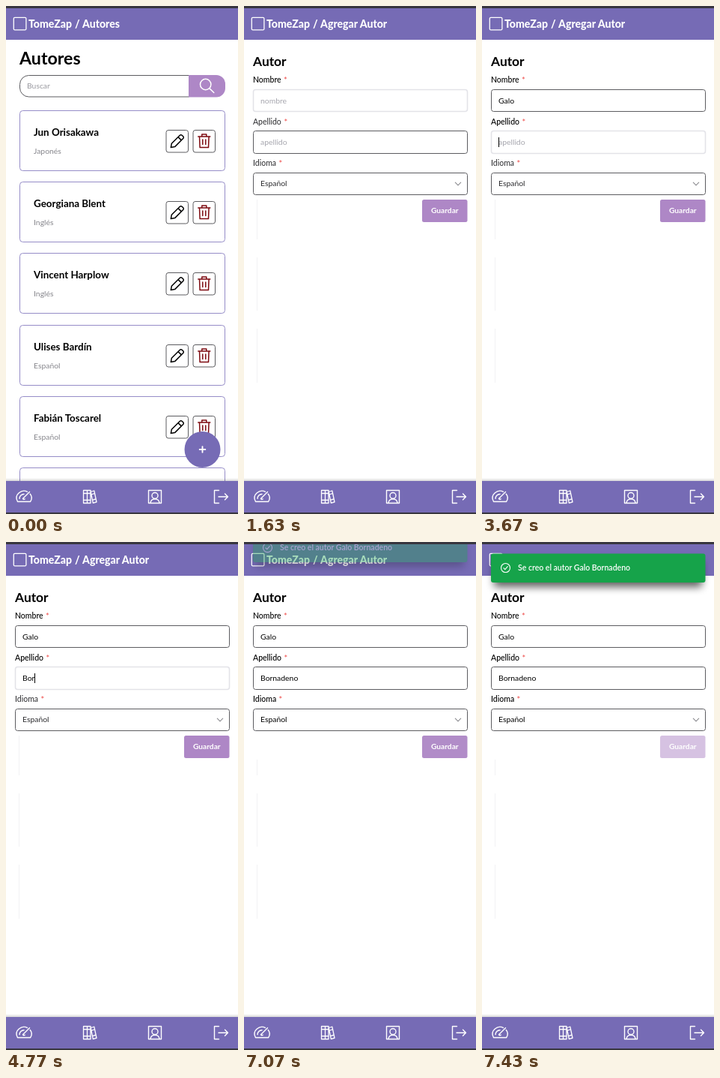
An HTML page that plays this animation: 310 by 677 pixels, repeating every 8 s.

```html
<!DOCTYPE html>
<html lang="es">
<head>
<meta charset="utf-8">
<title>Agregar autor</title>
<style>
  html, body { margin: 0; width: 100%; height: 100%; overflow: hidden; background: #fff; }
  svg { display: block; width: 310px; height: 677px; }
  text { font-family: Lato, Figtree, sans-serif; white-space: pre; }
  .line { fill: none; stroke-linecap: round; stroke-linejoin: round; }
</style>
</head>
<body>
<svg id="stage" viewBox="0 0 310 677" xmlns="http://www.w3.org/2000/svg"></svg>
<script>
const LOOP = 8000;
const PURPLE = '#766bb5', LILAC = '#ae87c6', GREEN = '#16a34a', BORDER = '#5c5c60', FOCUS = '#e3e3e8';
const FIRST = 'Galo', LAST = 'Bornadeno';
const FIRST_KEYS = [1930, 2130, 2500, 3270];
const LAST_KEYS = [4330, 4630, 4770, 5070, 5200, 5370, 5530, 5670, 5900];
const FOCUS_FIRST = 1100, FOCUS_LAST = 3670, SAVE = 6930;
const CARET_ON = [FOCUS_FIRST, ...FIRST_KEYS, FOCUS_LAST, ...LAST_KEYS];
const CARET_OFF = [1630, 2970, 4200, 6400];

const AUTHORS = [
  ['Jun Orisakawa', 'Japonés'],
  ['Georgiana Blent', 'Inglés'],
  ['Vincent Harplow', 'Inglés'],
  ['Ulises Bardín', 'Español'],
  ['Fabián Toscarel', 'Español'],
  ['', '']
];

const text = (x, y, size, weight, fill, str, extra = '') =>
  `<text x="${x}" y="${y}" font-size="${size}" font-weight="${weight}" fill="${fill}" ${extra}>${str}</text>`;
const box = (x, y, w, h, r, fill, stroke = 'none', extra = '') =>
  `<rect x="${x}" y="${y}" width="${w}" height="${h}" rx="${r}" fill="${fill}" stroke="${stroke}" ${extra}/>`;
const line = (d, stroke, width, at = '0 0') =>
  `<path class="line" transform="translate(${at})" d="${d}" stroke="${stroke}" stroke-width="${width}"/>`;

const PENCIL = 'M-8.5 8.5L-7.5 3.2L3.6-7.9a1.9 1.9 0 0 1 2.7 0L7.9-6.3a1.9 1.9 0 0 1 0 2.7L-3.2 7.5ZM1.2-5.5L5.5-1.2';
const TRASH = 'M-8-6.2H8M-3-6.2V-9H3V-6.2M-6.3-6.2L-5.7 8.5H5.7L6.3-6.2M-2-2V4.5M2-2V4.5';
const GAUGE = 'M-8.5 6.5H8.5C11 3 10.5-1 8.2-3.7M4.5-6.7C-3-10.5-14-3-8.5 6.5M-1.5 2.5L7.5-6.5M-6 2.5A6 6 0 0 1 0-3.5M-1.5 2.5A2 2 0 0 0 1.2 3';
const BOOKS = 'M-8.5-8.5H-3.5V8.5H-8.5ZM-3.5-8.5H1V8.5H-3.5ZM1.2-6.5L5.8-8L9 7L4.3 8.3ZM-8.5-4.5H1M-8.5 4.5H1M2-3L6.5-4.3M3.5 4.3L8.2 3';
const PERSON = 'M-8.5-8.5H8.5V8.5H-8.5ZM-4-1.5a4 4 0 1 0 8 0a4 4 0 1 0-8 0M-6 8C-5 1.5 5 1.5 6 8';
const EXIT = 'M-2.5-8.5H-8.5V8.5H-2.5M-3 0H9.5M5.5-4L9.5 0L5.5 4';

function card([name, lang], i) {
  const y = Math.round(139 + 95.2 * i) + 0.5;
  if (!name) return box(18.5, y, 274, 80, 4, '#fff', '#968dc8');
  return box(18.5, y, 274, 80, 4, '#fff', '#968dc8') +
    text(37, y + 33.8, 13.4, 700, '#000', name) +
    text(37, y + 57.5, 10.4, 400, '#86868c', lang) +
    box(214, y + 26, 29.5, 29.5, 3, '#fff', BORDER) +
    box(250, y + 26, 29.5, 29.5, 3, '#fff', BORDER) +
    line(PENCIL, '#000', 1.5, `228.8 ${y + 40.6}`) +
    line(TRASH, '#7d0a10', 1.5, `264.8 ${y + 40.6}`);
}

const listPage = `
  ${text(18, 77.5, 23.2, 700, '#000', 'Autores')}
  <path d="M244.500 92.500H30.500a12 12 0 0 0-12 12v4.500a12 12 0 0 0 12 12H244.500Z" fill="#fff" stroke="${BORDER}"/>
  <path d="M244 92H281a12 12 0 0 1 12 12v5.500a12 12 0 0 1-12 12H244Z" fill="${LILAC}"/>
  ${line('M-8.300-1.500a7.200 7.200 0 1 0 14.400 0a7.200 7.200 0 1 0-14.400 0M4 3.600L10 9.500', '#fff', 1.5, '267.800 106')}
  ${text(28, 110, 10.4, 400, '#9a9aa0', 'Buscar')}
  ${AUTHORS.map(card).join('')}
  <circle cx="262.500" cy="591" r="24" fill="${PURPLE}"/>
  ${line('M-3.800 0H3.800M0-3.800V3.800', '#fff', 1.9, '262.500 591')}`;

const label = (id, y, str, starX) =>
  text(12, y, 10.5, 500, '#000', str, `id="${id}Label"`) + text(starX, y + 1, 11, 500, '#ef5350', '*');

const formPage = `
  <path id="traces" stroke="#f2f2f4" fill="none"/>
  ${text(12, 80, 17.4, 700, '#000', 'Autor')}
  ${label('first', 102, 'Nombre', 53)}
  ${label('last', 158, 'Apellido', 53.5)}
  ${label('lang', 213, 'Idioma', 46.5)}
  ${box(12.5, 111.5, 286, 29, 3, '#fff', BORDER, 'id="firstBox"')}
  ${box(12.5, 166.5, 286, 30, 3, '#fff', BORDER, 'id="lastBox"')}
  ${box(12.5, 222.5, 286, 29, 3, '#fff', BORDER)}
  ${text(22, 130, 10.4, 400, '#000', '', 'id="first"')}
  ${text(22, 185.3, 10.4, 400, '#000', '', 'id="last"')}
  ${text(22, 240.3, 10.4, 400, '#000', 'Español', 'id="lang"')}
  ${line('M-3.700-1.800L0 1.800L3.700-1.800', '#8b8b90', 1.1, '286 237')}
  <rect id="caret" width="1" height="13" fill="#000"/>
  <g id="save">
    ${box(238, 258, 60.5, 30, 2.5, LILAC)}
    ${text(268.3, 276.3, 10.2, 700, '#fff', 'Guardar', 'text-anchor="middle"')}
  </g>`;

const toast = `
  ${box(16, 25, 278, 35, 3, '#000', 'none', 'opacity=".62" filter="url(#blur)"')}
  ${box(12, 15.5, 286.5, 38.5, 3, GREEN)}
  <circle cx="31.500" cy="34.500" r="6" fill="none" stroke="#fff" stroke-width="1.100"/>
  ${line('M-2.600 .2L-.7 2.100L2.700-1.900', '#fff', 1.1, '31.500 34.500')}
  ${text(48, 38, 10.5, 600, '#fff', `Se creo el autor ${FIRST} ${LAST}`)}`;

const stage = document.getElementById('stage');
stage.innerHTML = `
  <defs>
    <filter id="blur" x="-10%" y="-80%" width="120%" height="260%"><feGaussianBlur stdDeviation="5.500"/></filter>
    <linearGradient id="shade" x2="0" y2="1">
      <stop offset="0" stop-opacity="0"/><stop offset="1" stop-opacity=".16"/>
    </linearGradient>
    <clipPath id="view"><rect y="3" width="310" height="672"/></clipPath>
  </defs>
  <rect width="310" height="677" fill="#fff"/>
  <g id="listPage">${listPage}</g>
  <g id="formPage">${formPage}</g>
  <rect y="3" width="310" height="42" fill="${PURPLE}"/>
  ${box(10.3, 15.3, 16.6, 16.6, 1.5, 'none', '#fff', 'stroke-width="1.300"')}
  ${text(30, 29, 14.1, 800, '#fff', 'TomeZap')}
  ${text(92, 29, 14.1, 800, '#fff', '/')}
  ${text(102, 29, 14.1, 800, '#fff', '', 'id="crumb"')}
  <rect y="629" width="310" height="4" fill="url(#shade)"/>
  <rect y="633" width="310" height="42" fill="${PURPLE}"/>
  ${line(GAUGE, '#fff', 1.4, '24 654')}
  ${line(BOOKS, '#fff', 1.3, '112 654')}
  ${line(PERSON, '#fff', 1.4, '199 654')}
  ${line(EXIT, '#fff', 1.4, '287 654')}
  <g clip-path="url(#view)"><g id="toast">${toast}</g></g>
  <rect width="310" height="3" fill="#38363f"/>
  <rect y="675" width="310" height="2" fill="#38363f"/>`;

const el = {};
stage.querySelectorAll('[id]').forEach(node => el[node.id] = node);
const set = (id, attrs) => {
  for (const key in attrs) el[id].setAttribute(key, attrs[key]);
};
const write = (id, str) => {
  if (el[id].textContent !== str) el[id].textContent = str;
};
const clamp = v => Math.max(0, Math.min(1, v));
const latest = (times, t) => Math.max(-1, ...times.filter(at => at <= t));

// cubic-bezier(.4, 0, .2, 1)
function ease(x) {
  if (x <= 0 || x >= 1) return clamp(x);
  let lo = 0, hi = 1;
  for (let i = 0; i < 24; i++) {
    const s = (lo + hi) / 2, r = 1 - s;
    if (1.2 * r * r * s + 0.6 * r * s * s + s * s * s < x) lo = s; else hi = s;
  }
  return lo * lo * (3 - 2 * lo);
}

function field(id, value, keys, hint, focused, t) {
  const typed = value.slice(0, keys.filter(at => at <= t).length);
  write(id, typed || hint);
  set(id, { fill: typed ? '#000' : '#a6a6ae' });
  set(id + 'Box', { stroke: focused ? FOCUS : BORDER, 'stroke-width': focused ? 1.6 : 1 });
  return typed ? el[id].getComputedTextLength() : 0;
}

function soften(id, soft) {
  set(id, { 'font-weight': soft ? 400 : 500, fill: soft ? '#2a2a2d' : '#000' });
}

function draw(t) {
  // The page swap happens in three quick steps.
  const swap = t < 500 ? 0 : t < 533 ? 0.33 : t < 570 ? 0.67 : 1;
  set('listPage', { opacity: 1 - swap });
  set('formPage', { opacity: swap });
  write('crumb', swap ? 'Agregar Autor' : 'Autores');

  const onFirst = t >= FOCUS_FIRST && t < FOCUS_LAST;
  const onLast = t >= FOCUS_LAST && t < SAVE;
  const firstWidth = field('first', FIRST, FIRST_KEYS, 'nombre', onFirst, t);
  const lastWidth = field('last', LAST, LAST_KEYS, 'apellido', onLast, t);
  soften('lastLabel', t < FOCUS_LAST);
  soften('langLabel', t < SAVE);
  set('lang', { fill: t < SAVE ? '#2a2a2d' : '#000' });

  const lit = (onFirst || onLast) && latest(CARET_ON, t) > latest(CARET_OFF, t);
  set('caret', {
    x: Math.round(21.6 + (onLast ? lastWidth : firstWidth)),
    y: onLast ? 175 : 120,
    opacity: lit ? 1 : 0
  });
  set('traces', { d: `M17.500 ${t < SAVE ? 258 : 290}V311M17.500 335V406M17.500 430V502` });

  set('save', { opacity: 1 - 0.5 * clamp((t - 7050) / 220) });
  const p = ease((t - 6950) / 400);
  set('toast', { opacity: p, transform: `translate(0 ${-43 * (1 - p)})` });
}

function tick() {
  draw(performance.now() % LOOP);
  requestAnimationFrame(tick);
}
tick();
</script>
</body>
</html>
```
